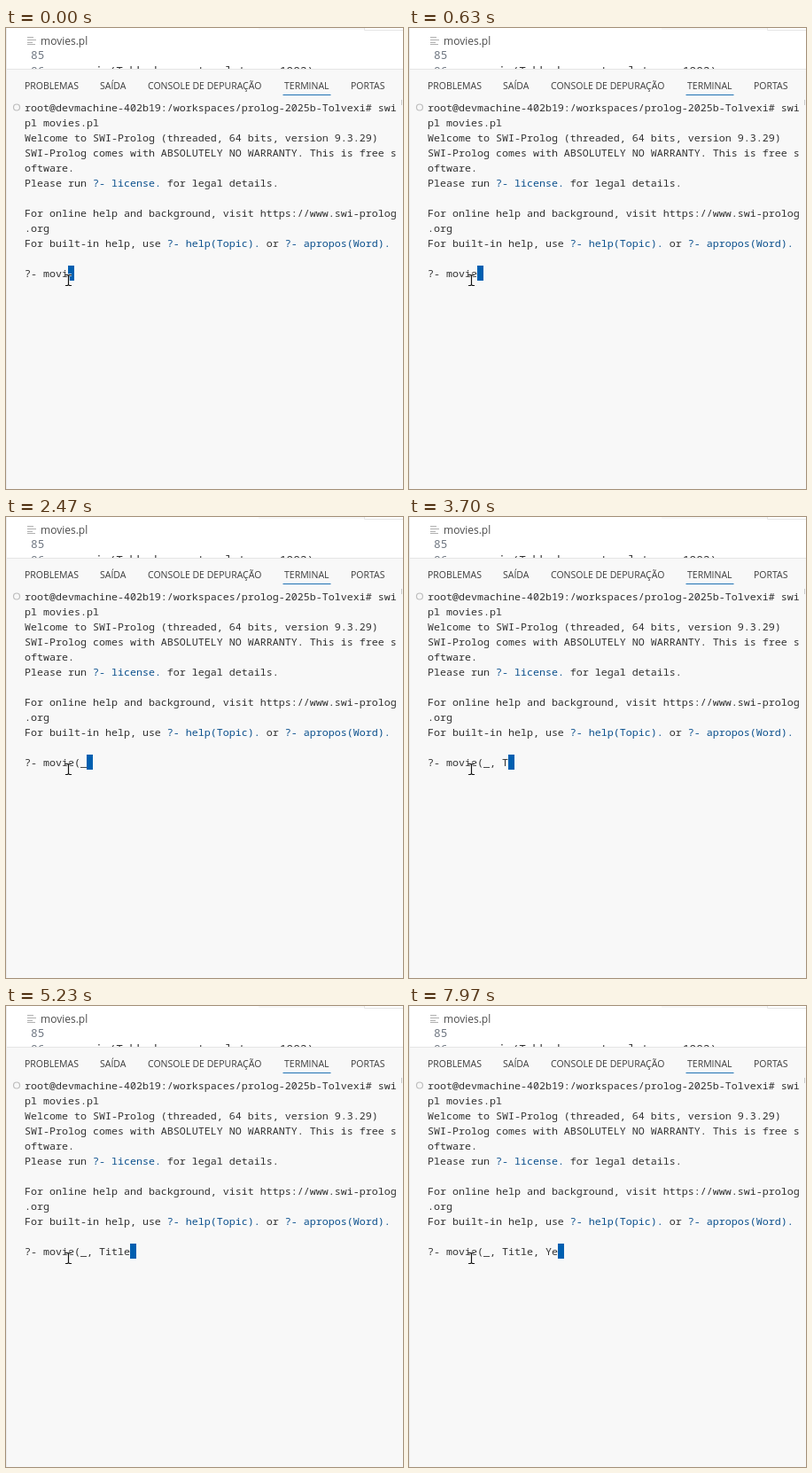
Write an HTML page that moves like this. It is 448x520 px and loops after 8000 ms.

```html
<!DOCTYPE html>
<html lang="pt">
<head>
<meta charset="utf-8">
<title>Terminal</title>
<style>
  html, body { margin: 0; width: 100%; height: 100%; overflow: hidden; background: #f8f8f8; }
  svg { display: block; }
  text { white-space: pre; fill: #303030; }
  .ui { font-family: "Open Sans", "Noto Sans", sans-serif; }
  .tab { font-size: 10.5px; fill: #3b3b3b; }
  .file { font-size: 12px; fill: #4c4c4c; }
  .code { font: 12.83px "Noto Sans Mono", "DejaVu Sans Mono", monospace; }
  .code .number { fill: #6e7681; }
  .term { font: 11.667px "Noto Sans Mono", "DejaVu Sans Mono", monospace; }
  .hint { fill: #0a4f8c; }
</style>
</head>
<body>
<svg width="448" height="520" viewBox="0 0 448 520">
  <rect width="448" height="520" fill="#f8f8f8"/>

  <!-- Editor strip above the panel -->
  <rect width="448" height="46" fill="#fff"/>
  <rect x="285" width="119" height="2" fill="#f8f8f8"/>
  <path d="M404.5 0V2.5H448" fill="none" stroke="#e5e5e5"/>
  <path d="M24 10.5h7M24 13.5h10M24 16.5h6M24 18.5h9" stroke="#b0b0b0"/>
  <text class="ui file" x="39" y="19">movies.pl</text>
  <svg class="code" width="448" height="46">
    <text class="number" x="28" y="35">85</text>
    <text class="number" x="28" y="53">86</text>
    <text x="78" y="53">movie(Tobkadner, stamplot, q, 1982).</text>
  </svg>
  <path d="M0 46.5H448" stroke="#e5e5e5"/>
  <path d="M.5 0V520" stroke="#ebebeb"/>

  <g class="ui" id="tabs"></g>
  <path d="M312.5 75.5H366.5" stroke="#1f72b4"/>

  <circle cx="12" cy="89.5" r="3.5" fill="none" stroke="#bdbdbd" stroke-width="1.2"/>
  <path d="M446.5 81v6" stroke="#c9c9c9"/>
  <g class="term" id="output"></g>
  <text class="term" id="input" x="21" y="281"></text>
  <rect id="cursor" y="268" width="7" height="17" fill="#005fb0"/>

  <!-- Mouse pointer -->
  <g fill="none">
    <path id="beam" d="M67 278.5h2.5l1 1 1-1h2.5M70.5 279v11M67 290.5h2.5l1-1 1 1h2.5" stroke="#fff" stroke-width="2.6"/>
    <path d="M67 278.5h2.5l1 1 1-1h2.5M70.5 279v11M67 290.5h2.5l1-1 1 1h2.5" stroke="#111" stroke-width="1.2"/>
  </g>
</svg>
<script>
const LOOP = 8000, LEFT = 21, CELL = 7, LINE = 17;
const byId = id => document.getElementById(id);

const tabs = [[21, 'PROBLEMAS'], [106, 'SAÍDA'], [160, 'CONSOLE DE DEPURAÇÃO'], [314, 'TERMINAL'], [389, 'PORTAS']];
byId('tabs').innerHTML = tabs.map(([x, label]) =>
  `<text class="tab" x="${x}" y="69">${label}</text>`).join('');

// Braces mark highlighted commands.
const lines = [
  'root@devmachine-402b19:/workspaces/prolog-2025b-Tolvexi# swi',
  'pl movies.pl',
  'Welcome to SWI-Prolog (threaded, 64 bits, version 9.3.29)',
  'SWI-Prolog comes with ABSOLUTELY NO WARRANTY. This is free s',
  'oftware.',
  'Please run {?- license.} for legal details.',
  '',
  'For online help and background, visit https://www.swi-prolog',
  '.org',
  'For built-in help, use {?- help(Topic).} or {?- apropos(Word).}'
];
byId('output').innerHTML = lines.map((line, i) =>
  `<text x="${LEFT}" y="${94 + i * LINE}">${line.replace(/{(.*?)}/g, '<tspan class="hint">$1</tspan>')}</text>`).join('');

const prompt = '?- movi';
const typed = 'e(_, Title, Ye';
const keyTimes = [180, 1250, 1800, 2700, 2900, 3450, 3800, 3980, 4180, 4380, 6700, 6900, 7450, 7650];

function draw(now) {
  const t = now % LOOP;
  const text = prompt + typed.slice(0, keyTimes.filter(k => k <= t).length);
  byId('input').textContent = text;
  byId('cursor').setAttribute('x', LEFT + text.length * CELL);
  requestAnimationFrame(draw);
}
draw(0);
</script>
</body>
</html>
```
